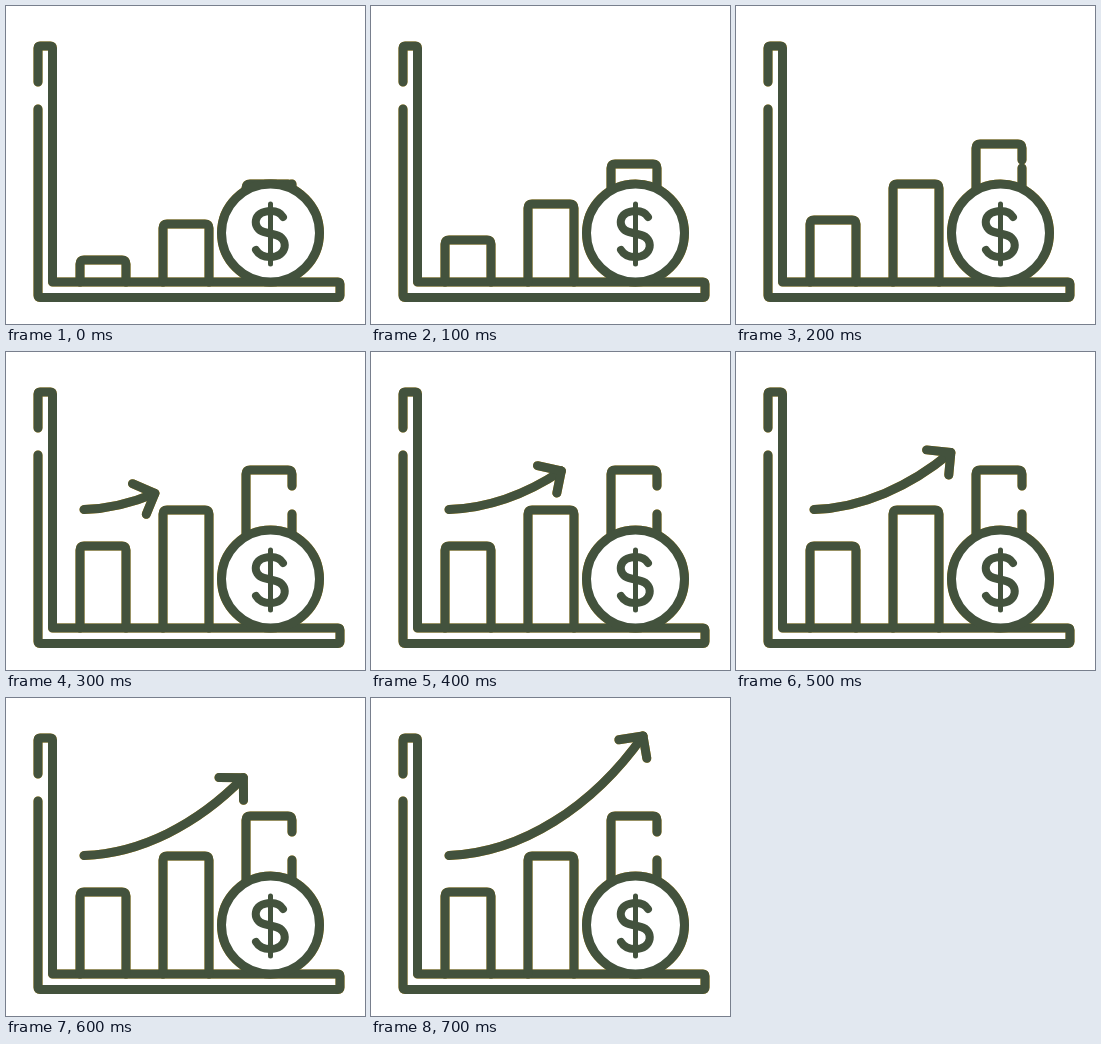
Recreate the animation shown at these times as an HTML page. Size 359 px wide and 318 px high, loop 2.8 s.

```html
<!DOCTYPE html>
<html lang="en">
<head>
<meta charset="utf-8">
<title>Growth chart</title>
<style>
  html, body { margin: 0; width: 100%; height: 100%; overflow: hidden; background: #fff; }
  svg { display: block; width: 100%; height: 100%; }
  .ink {
    fill: none; stroke: #43523d; stroke-width: 9;
    stroke-linecap: round; stroke-linejoin: round;
    filter: drop-shadow(0 0 .5px #e0a820);
  }
</style>
</head>
<body>
<svg viewBox="0 0 359 318">
  <g class="ink">
    <path d="M32 76V42q0-2 2-2H44.500q2 0 2 2V276H332q2 0 2 2V289.500q0 2-2 2H34q-2 0-2-2V103"/>
    <path id="bars"/>
    <circle cx="264.500" cy="227" r="49" fill="#fff"/>
    <path stroke-width="8" d="M277 211C274 206 270 205 265 205C246 205 246 223 258 226L270 229C283 232 282 251 264 251C257 251 253 249 250 244"/>
    <path stroke-width="5" d="M264.500 198V258"/>
    <g id="arrow">
      <path id="shaft" d="M78 157.500C150 155 222 109 272 38"/>
      <path id="head" d="M-17-17.500L0 0L-16 16"/>
    </g>
  </g>
</svg>
<script>
const [bars, arrow, shaft, head] =
  ["bars", "arrow", "shaft", "head"].map(id => document.getElementById(id));
const STEP = 100, LOOP = 2800;
const length = shaft.getTotalLength();
// Share of the arrow's path covered at each step
const reach = [0, 0, 0, 0.31, 0.51, 0.64, 0.77, 1];

const barTop = (x, y) => `V${y + 4}q0-4 4-4H${x + 42}q4 0 4 4`;
const bar = (x, y) => `M${x} 276${barTop(x, y)}V276`;

function draw(step) {
  const drop = Math.max(0, 60 - 20 * step);
  const tallTop = 118 + drop;
  bars.setAttribute("d",
    bar(74, 194 + drop) + bar(157, 158 + drop) +
    `M240 190${barTop(240, tallTop)}V${tallTop + 16}` +
    `M286 ${Math.max(162, tallTop)}V190`);

  const travelled = reach[step] * length;
  arrow.style.display = travelled ? "" : "none";
  if (!travelled) return;
  const tip = shaft.getPointAtLength(travelled);
  const before = shaft.getPointAtLength(travelled - 2);
  const angle = Math.atan2(tip.y - before.y, tip.x - before.x) * 180 / Math.PI;
  shaft.setAttribute("stroke-dasharray", `${travelled} 999`);
  head.setAttribute("transform", `translate(${tip.x} ${tip.y}) rotate(${angle})`);
}

function tick() {
  const time = performance.now() % LOOP;
  draw(Math.min(reach.length - 1, Math.floor(time / STEP)));
  requestAnimationFrame(tick);
}
tick();
</script>
</body>
</html>
```
